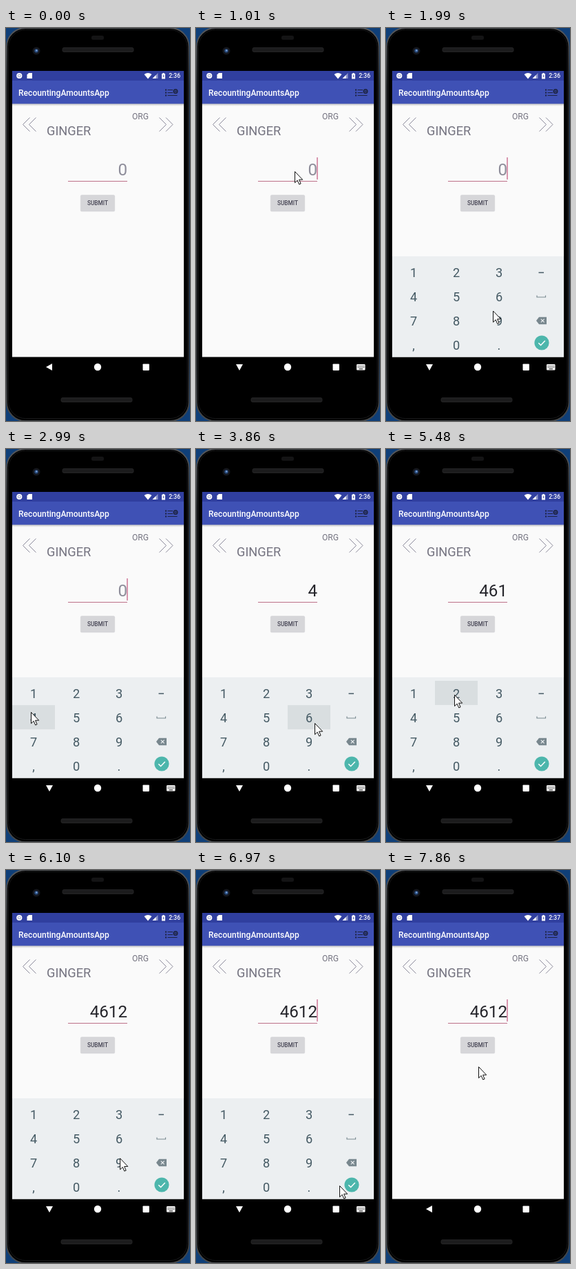
Animation of 267 by 568 pixels, one loop 7990 ms. Source, as an HTML page:

```html
<!DOCTYPE html>
<html lang="en">
<head>
<meta charset="utf-8">
<title>Number entry on a phone</title>
<style>
  html, body { margin: 0; width: 100%; height: 100%; overflow: hidden; background: #000; }
  svg { display: block; width: 100%; height: 100%; font-family: Roboto, sans-serif; }
  .medium { font-weight: 500; }
  .end { text-anchor: end; }
  .mid { text-anchor: middle; }
</style>
</head>
<body>
<svg viewBox="0 0 267 568">
  <defs>
    <linearGradient id="shade" x2="0" y2="1">
      <stop stop-color="#000" stop-opacity=".25"/>
      <stop offset="1" stop-color="#000" stop-opacity="0"/>
    </linearGradient>
    <linearGradient id="rim" x2="0" y2="1">
      <stop stop-color="#55585c"/>
      <stop offset=".15" stop-color="#2b2d30"/>
      <stop offset=".85" stop-color="#2b2d30"/>
      <stop offset="1" stop-color="#45484b"/>
    </linearGradient>
    <clipPath id="screen"><rect x="9" y="62" width="249" height="413.5"/></clipPath>
  </defs>

  <!-- Phone body -->
  <rect width="267" height="568" fill="#0f3f78"/>
  <rect x="1" y="0" width="264.5" height="568" rx="27" fill="#000" stroke="url(#rim)" stroke-width="2"/>
  <rect x="3.5" y="2.5" width="259.5" height="562" rx="25" fill="#000" stroke="#18191a"/>
  <rect x="124" y="11" width="18" height="6" rx="2.5" fill="#141415"/>
  <g fill="#1c1c1d" stroke="#2a2a2b" stroke-width=".8">
    <rect x="82" y="28.5" width="103" height="6" rx="2"/>
    <rect x="80" y="534.5" width="103" height="6" rx="2"/>
  </g>
  <circle cx="44" cy="33" r="5.5" fill="#15171d"/>
  <circle cx="44" cy="33" r="2.8" fill="#274a7c"/>
  <circle cx="44.3" cy="32.5" r="1.2" fill="#7fa6dc"/>

  <!-- App page -->
  <rect x="9" y="62" width="249" height="413.5" fill="#fafafa"/>
  <rect x="9" y="109" width="249" height="4" fill="url(#shade)"/>
  <rect x="9" y="62" width="249" height="14.5" fill="#303f9f"/>
  <rect x="9" y="76" width="249" height="33.5" fill="#3f51b5"/>
  <g fill="#fff">
    <circle cx="19.3" cy="69" r="3.2" fill="#8f98cc" stroke="#fff" stroke-width="1.8"/>
    <circle cx="19.3" cy="69" r="1.4"/>
    <path d="M30.5 67.5L33 65H38V73H30.5Z"/>
    <path d="M200.5 67Q206 63 211.5 67L206 73.5Z"/>
    <path d="M220.5 65V73H212.5Z" fill-opacity=".45"/>
    <path d="M217.5 68V73H212.5Z"/>
    <path d="M226 66h1.4v-1h2.2v1H231v7.5h-5z"/>
    <path d="M228.8 67l-1.3 3h1v2l1.2-2.8h-1z" fill="#303f9f"/>
    <text id="clock" class="medium end" x="253" y="72" font-size="8.5"></text>
    <text class="medium" x="18" y="97.5" font-size="12.1">RecountingAmountsApp</text>
  </g>
  <g stroke="#1d2340" stroke-width="1.2" fill="none">
    <path d="M234.5 89.5H242M234.5 93.5H242M234.5 97.5H248.5"/>
    <path d="M231 89.5h2M231 93.5h2M231 97.5h2" stroke-width="2"/>
    <circle cx="246" cy="91.5" r="2.7" stroke-width="1.6"/>
    <path d="M246 89.5v4M244 91.5h4" stroke-width=".8"/>
  </g>
  <g fill="#757481">
    <text x="59" y="155" font-size="18.2">GINGER</text>
    <text class="end" x="207" y="132" font-size="12.1">ORG</text>
  </g>
  <g id="chevrons" fill="none" stroke="#8b8a9a"></g>
  <text id="value" class="end" x="176" y="213" font-size="24.2"></text>
  <rect x="90" y="221" width="86" height="1" fill="#bd7189"/>
  <rect id="caret" x="175.4" y="187" width="1.2" height="32" fill="#c2557c"/>
  <rect x="108.3" y="241.5" width="49.4" height="23.5" rx="1.5" fill="#d6d6d9" stroke="#cdcdd0" stroke-width=".5"/>
  <text class="medium mid" x="133" y="255.8" font-size="8.3" fill="#454453">SUBMIT</text>

  <!-- Keyboard -->
  <g clip-path="url(#screen)">
    <g id="keyboard">
      <rect x="9" y="330" width="249" height="146" fill="#eceff1"/>
      <rect id="press" width="62" height="35" fill="#d9dee0"/>
      <g id="keys" class="mid" font-size="18.2" fill="#455a64"></g>
      <path d="M221.5 353.5h7.5" stroke="#455a64" stroke-width="1.3"/>
      <path d="M219 386.5v2.5h12.5v-2.5" fill="none" stroke="#7c8b92" stroke-width="1.2"/>
      <path d="M218 423l4-5.2h11v10.4h-11z" fill="#78878e"/>
      <path d="M224.8 420.6l4.8 4.8m0-4.8l-4.8 4.8" stroke="#eceff1" stroke-width="1.2"/>
      <circle cx="226" cy="455" r="10.6" fill="#4db6ac"/>
      <path d="M221.3 455.2l3.3 3.3 6.2-6.5" fill="none" stroke="#fff" stroke-width="1.5"/>
    </g>
  </g>

  <!-- Navigation bar -->
  <g fill="#fff">
    <path id="back" d="M-5 0L4-5V5Z"/>
    <circle cx="133" cy="490" r="5.2"/>
    <rect x="198.5" y="485.5" width="9.4" height="9.4" rx=".8"/>
    <g id="imeIcon">
      <rect x="233" y="486" width="12.5" height="8.5" rx="1"/>
      <path d="M234.6 488.5h9.5M234.6 490.6h9.5" stroke="#000" stroke-dasharray="1.1 1"/>
      <path d="M236.5 492.8h5.5" stroke="#000" stroke-width=".9"/>
    </g>
  </g>

  <path id="cursor" d="M.5.5V16.7L4.2 13.2 6.7 19 9.1 18 6.6 12.2H11.7Z" fill="#fff" stroke="#111" stroke-linejoin="round"/>
</svg>

<script>
const LOOP = 7990, STEPS = 64, BLINK = 8, PRESS = 2;
const SVG = 'http://www.w3.org/2000/svg';
const el = id => document.getElementById(id);
const set = (node, attrs) => Object.entries(attrs).forEach(([k, v]) => node.setAttribute(k, v));

function add(parent, tag, attrs, text = '') {
  const node = document.createElementNS(SVG, tag);
  set(node, attrs);
  node.textContent = text;
  el(parent).append(node);
}

for (const [x, dir] of [[24.5, 1], [33.5, 1], [232.5, -1], [242, -1]]) {
  add('chevrons', 'path', { d: `M${x + 10 * dir} 129.5L${x} 139.5L${x + 10 * dir} 149.5` });
}

const keyX = i => 40 + 62 * (i % 3);
const keyY = i => 353 + 35.2 * Math.floor(i / 3);
[...'123456789,0.'].forEach((label, i) =>
  add('keys', 'text', { x: keyX(i), y: keyY(i) + 6.7 }, label));

// Times count steps, about eight per second.
const taps = [
  { at: 7, digit: '' }, { at: 24, digit: '4' }, { at: 31, digit: '6' },
  { at: 39, digit: '1' }, { at: 44, digit: '2' }
];
const glides = [
  { from: 1, to: 6, x: 131, y: 199 },
  { from: 6, to: 8, x: 143, y: 207 },
  { from: 8, to: 15, x: 155, y: 408.5 },
  { from: 16, to: 23, x: 36, y: 380 },
  { from: 26, to: 30, x: 172, y: 396 },
  { from: 33, to: 38, x: 39, y: 350.5 },
  { from: 41, to: 44, x: 99, y: 355 },
  { from: 46, to: 49.5, x: 208, y: 456 },
  { from: 59, to: 63, x: 134, y: 284 }
];
const ime = { open: 8, close: 55 };

const ramp = (s, from, to) => Math.min(1, Math.max(0, (s - from) / (to - from)));
const smooth = p => p * p * (3 - 2 * p);

function pointerAt(s) {
  let x = 202, y = 411;
  for (const g of glides) {
    const p = smooth(ramp(s, g.from, g.to));
    x += (g.x - x) * p;
    y += (g.y - y) * p;
  }
  return `translate(${x} ${y})`;
}

function show(id, visible) {
  el(id).style.visibility = visible ? 'visible' : 'hidden';
}

function draw(s) {
  show('cursor', s >= 1);
  set(el('cursor'), { transform: pointerAt(s) });

  // Every tap restarts the caret's blink and registers one step later.
  const done = taps.filter(tap => tap.at < s);
  const lastTap = done.length ? done[done.length - 1].at : 2 - BLINK;
  show('caret', (s - lastTap) % BLINK < BLINK / 2);
  const value = done.map(tap => tap.digit).join('');
  el('value').textContent = value || '0';
  set(el('value'), { fill: value ? '#25252b' : '#8e8d9a' });
  el('clock').textContent = s < 60 ? '2:36' : '2:37';

  const shown = ramp(s, ime.open, ime.open + 3) - ramp(s, ime.close, ime.close + 3);
  set(el('keyboard'), { opacity: shown, transform: `translate(0 ${(1 - shown) * 30})` });
  const press = taps.find(tap => tap.digit && s >= tap.at && s < tap.at + PRESS);
  show('press', press);
  if (press) set(el('press'), { x: keyX(press.digit - 1) - 31, y: keyY(press.digit - 1) - 18 });

  const imeOpen = s >= ime.open && s < ime.close + 2;
  set(el('back'), { transform: `translate(63 490) rotate(${imeOpen ? -90 : 0})` });
  show('imeIcon', imeOpen);
}

function tick() {
  const t = performance.now() % LOOP;
  draw(Math.min(STEPS - 1, Math.floor((t + 15) * STEPS / LOOP)));
  requestAnimationFrame(tick);
}
tick();
</script>
</body>
</html>
```
